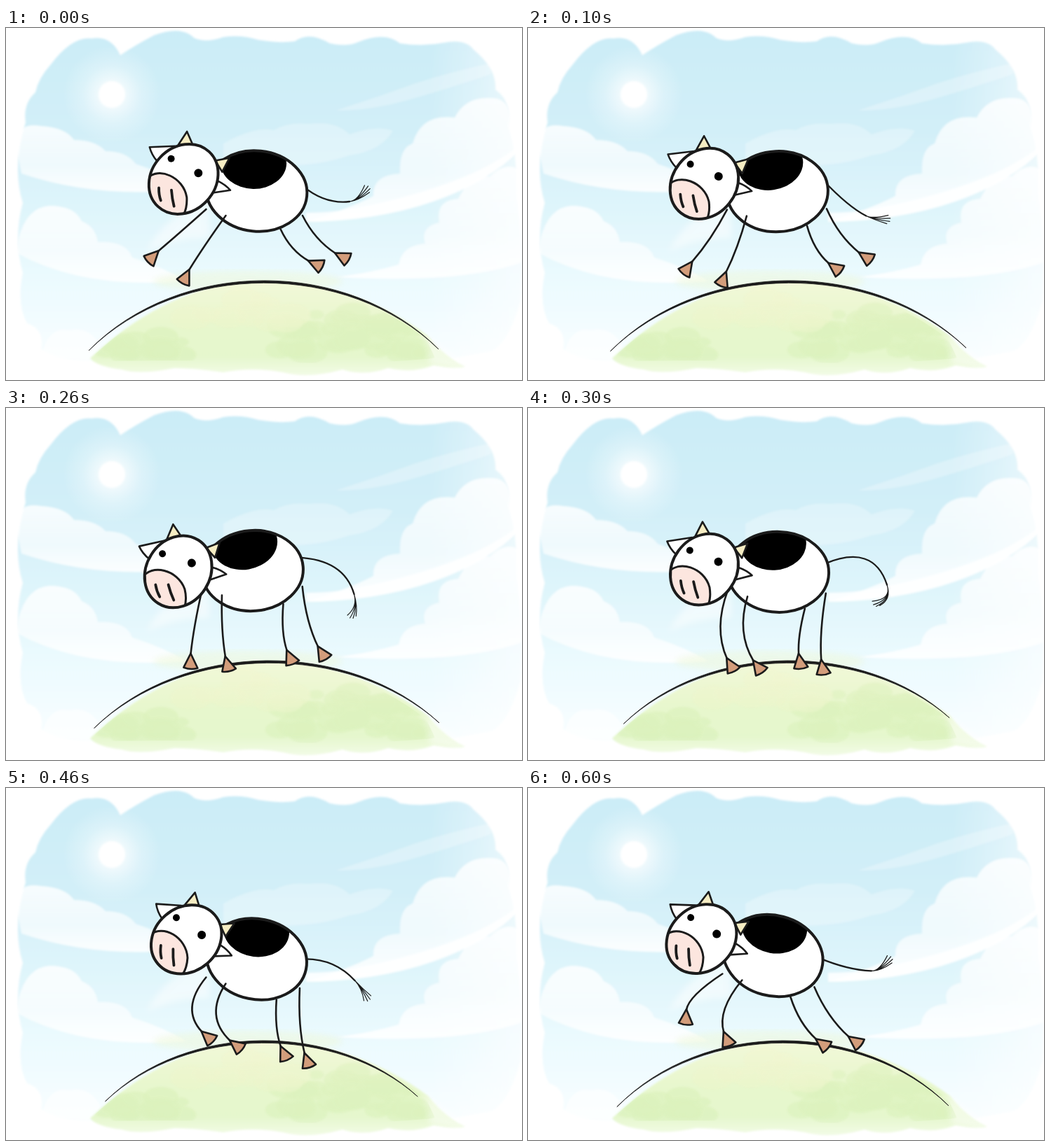
Recreate the animation shown at these times as an HTML page. Size 736 px wide and 503 px high, loop 0.7 s.

```html
<!DOCTYPE html>
<html lang="en">
<head>
<meta charset="utf-8">
<title>Galloping cow</title>
<style>
html, body { margin: 0; width: 100%; height: 100%; overflow: hidden; background: #fff; }
svg { display: block; }
.ink { stroke: #1b1b1b; stroke-linejoin: round; stroke-linecap: round; fill: none; }
</style>
</head>
<body>
<svg width="736" height="503" viewBox="0 0 736 503">
  <defs>
    <linearGradient id="sky" x1="0" y1="0" x2="0" y2="1">
      <stop offset="0" stop-color="#cbecf7"/>
      <stop offset=".3" stop-color="#d2eff8"/>
      <stop offset=".55" stop-color="#dff5fb"/>
      <stop offset=".75" stop-color="#ebfafe"/>
      <stop offset="1" stop-color="#f9feff"/>
    </linearGradient>
    <linearGradient id="side">
      <stop offset=".82" stop-color="#fff" stop-opacity="0"/>
      <stop offset="1" stop-color="#fff" stop-opacity=".6"/>
    </linearGradient>
    <linearGradient id="puff" x1="0" y1="0" x2="0" y2="1">
      <stop offset="0" stop-color="#fff" stop-opacity=".82"/>
      <stop offset=".6" stop-color="#fff" stop-opacity=".6"/>
      <stop offset="1" stop-color="#fff" stop-opacity=".88"/>
    </linearGradient>
    <radialGradient id="glow">
      <stop offset=".25" stop-color="#fff" stop-opacity=".7"/>
      <stop offset=".6" stop-color="#fff" stop-opacity=".27"/>
      <stop offset="1" stop-color="#fff" stop-opacity="0"/>
    </radialGradient>
    <linearGradient id="grass" x1="0" y1="0" x2="0" y2="1">
      <stop offset="0" stop-color="#f2f8d8"/>
      <stop offset=".5" stop-color="#e7f7cd"/>
      <stop offset=".8" stop-color="#e5f7cd"/>
      <stop offset="1" stop-color="#f2fbe6"/>
    </linearGradient>
    <filter id="soft"><feGaussianBlur stdDeviation="1.5"/></filter>
    <filter id="haze"><feGaussianBlur stdDeviation="5"/></filter>
    <clipPath id="meadow"><path d="M125 468Q235 364 365 364T600 445L612 472Q500 482 400 478T125 476Z"/></clipPath>
    <clipPath id="skull"><ellipse rx="45.5" ry="53.5" transform="rotate(42)"/></clipPath>
    <clipPath id="trunk"><ellipse rx="72" ry="57.5" transform="rotate(5)"/></clipPath>
  </defs>

  <g filter="url(#soft)">
    <path fill="url(#sky)" d="M28 135Q24 108 42 92Q46 72 64 52Q94 12 122 15Q150 10 163 39Q185 24 212 10Q250-4 268 14Q285 22 310 13Q335 9 360 17Q390 22 412 19Q432 4 462 22Q485 27 500 21Q540 4 562 22Q595 27 625 21Q655 15 667 31Q700 58 698 88Q722 105 716 140Q730 180 728 240Q738 300 734 390Q715 455 690 462L620 475H130Q70 476 50 458Q55 430 30 422Q15 395 24 350Q10 300 24 250Q8 200 28 135Z"/>
    <path fill="url(#side)" d="M0 0H736V503H0Z"/>
  </g>
  <circle cx="151" cy="95" r="70" fill="url(#glow)"/>
  <circle cx="151" cy="95" r="19" fill="#fff" filter="url(#soft)"/>

  <g filter="url(#soft)">
    <g fill="#fff" opacity=".28">
      <path d="M692 50Q620 66 570 84T470 118Q520 118 570 104T692 66Z"/>
      <path d="M310 165Q355 140 382 146Q400 134 432 137Q470 132 490 152Q530 138 552 147Q535 176 490 182Q450 196 400 197L310 200Z"/>
    </g>
    <g fill="url(#puff)">
      <path d="M12 160Q20 134 50 140Q85 142 97 160Q128 160 142 176Q172 176 185 194L215 205V234Q110 238 22 208Z"/>
      <path d="M524 240Q522 210 562 208Q560 172 580 165Q592 122 640 128Q655 98 690 100Q722 98 718 140Q736 150 735 172Q685 225 590 253Q510 276 428 277Q490 258 524 240Z"/>
      <path d="M18 300Q30 256 62 254Q98 254 108 276Q128 284 131 306Q172 304 180 328Q220 340 258 362Q110 374 16 322Z"/>
      <path d="M560 338Q565 310 598 308Q590 284 618 278Q612 246 645 244Q660 212 690 212Q715 188 736 205V335Q650 366 470 356Q520 350 560 338Z"/>
    </g>
    <path fill="#fff" opacity=".85" d="M735 165Q690 205 590 235T428 264V277Q530 276 610 248T735 172Z"/>
    <path fill="#fff" opacity=".5" d="M200 320Q225 270 290 240V300Q240 300 200 320Z" filter="url(#haze)"/>
    <path fill="#fff" opacity=".6" d="M50 470Q60 425 90 432Q120 425 135 455L120 475Z"/>
  </g>

  <ellipse cx="345" cy="362" rx="135" ry="15" fill="#eef8dc" opacity=".6" filter="url(#haze)"/>
  <path fill="url(#grass)" filter="url(#soft)" d="M120 472Q235 363 365 362T602 440Q625 470 655 484Q640 488 610 482Q580 494 545 486Q510 498 480 488Q430 502 395 492Q350 484 310 492Q270 486 240 486Q190 496 165 488Q130 484 120 472Z"/>
  <path fill="#fff" opacity=".5" filter="url(#haze)" d="M596 435L665 490L605 480Z"/>
  <g id="dabs" clip-path="url(#meadow)" filter="url(#soft)" opacity=".2"></g>

  <path id="hill" fill="#1b1b1b" stroke="#1b1b1b" stroke-width=".8"/>
  <g id="tail" class="ink"></g>
  <g id="body">
    <ellipse rx="72" ry="57.5" transform="rotate(5)" fill="#fff"/>
    <ellipse cx="-5" cy="-40" rx="47" ry="37" clip-path="url(#trunk)"/>
    <ellipse class="ink" rx="72" ry="57.5" transform="rotate(5)" stroke-width="4"/>
  </g>
  <g id="legs" class="ink" stroke-width="2.6"></g>
  <g id="head">
    <g class="ink" stroke-width="2.6">
      <path fill="#fff" d="M-38-25Q-46-34-49-45L-13-47ZM49 2Q60 7 67 15L42 19Z"/>
      <path fill="#f6edc3" d="M-8-49L4-68L13-48ZM45-27L65-31L55-11Z"/>
    </g>
    <ellipse rx="45.5" ry="53.5" transform="rotate(42)" fill="#fff"/>
    <path class="ink" style="fill:#fce6df" stroke-width="3" clip-path="url(#skull)" d="M-52 0C-36-18 0-3 5 26Q6 42 0 52L-60 75L-80 10Z"/>
    <ellipse class="ink" rx="45.5" ry="53.5" transform="rotate(42)" stroke-width="4"/>
    <path class="ink" stroke-width="3.8" d="M-35 13Q-35 23-32 31M-17 16Q-16 28-13 39"/>
    <circle cx="-18" cy="-29" r="5"/>
    <circle cx="21" cy="-9" r="6"/>
  </g>
</svg>

<script>
const $ = id => document.getElementById(id);
const STEP = 100, POSES = 7;
let phase = 0;

// Periodic value: mean plus first and second harmonic of the gallop
const wave = (mean, c, s, c2 = 0, s2 = 0) => mean +
  c * Math.cos(phase) + s * Math.sin(phase) +
  c2 * Math.cos(2 * phase) + s2 * Math.sin(2 * phase);

function attach({ x, y, turn }, dx, dy) {
  const a = turn * Math.PI / 180;
  return [x + dx * Math.cos(a) - dy * Math.sin(a), y + dx * Math.sin(a) + dy * Math.cos(a)];
}

const place = (id, { x, y, turn }) =>
  $(id).setAttribute('transform', `translate(${x} ${y}) rotate(${turn})`);

function leg([hx, hy], [bx, by], fx, fy) {
  const kx = (hx + fx) / 2 + bx, ky = (hy + fy) / 2 + by;
  const turn = Math.atan2(fy - ky, fx - kx) * 180 / Math.PI;
  return `<path d="M${hx} ${hy}Q${kx} ${ky} ${fx} ${fy}"/>
    <path fill="#d39d7b" transform="translate(${fx} ${fy}) rotate(${turn - 6})" d="M-1 0L20-10Q23 0 19 10Z"/>`;
}

function tail([x, y]) {
  const bx = wave(466, -14, 12, 3, -9), by = wave(243, 20, -25, -11, 18);
  const ux = wave(493, -9, 4, 6, -7), uy = wave(266, -6, -8, -12, 10);
  const aim = wave(29, -65, 47, 0, -16) * Math.PI / 180;
  const cx = ux + (ux - bx) * .35, cy = uy + (uy - by) * .35;
  let hairs = '';
  for (let i = -1.5; i < 2; i++) {
    const a = aim + i * .13, len = 36 - 3 * Math.abs(i);
    hairs += `M${ux} ${uy}Q${cx} ${cy} ${ux + len * Math.cos(a)} ${uy + len * Math.sin(a)}`;
  }
  return `<path stroke-width="2.3" d="M${x} ${y}Q${bx} ${by} ${ux} ${uy}"/>
    <path stroke-width="1.2" d="${hairs}"/>`;
}

// Arch through a fixed crest, tapering to both ends
function ridge(crest, thick) {
  const lx = wave(129, -11, -6), ly = wave(455, 6, 4);
  const rx = wave(605, 12, 16), ry = wave(450, 9, 2);
  const cy = (crest - (ly + ry) / 8) / .75, inset = (rx - lx) * .26;
  const edge = d => `${lx + inset} ${cy + d} ${rx - inset} ${cy + d}`;
  const back = `${rx - inset} ${cy + thick} ${lx + inset} ${cy + thick}`;
  return `M${lx} ${ly}C${edge(0)} ${rx} ${ry}C${back} ${lx} ${ly}`;
}

function draw(pose) {
  phase = 2 * Math.PI * pose / POSES;
  const body = {
    x: wave(354, -.7, 2.3, 4.2, 1.5), y: wave(238, -3, -7, -2, 2.6), turn: wave(1.4, -.5, -11.4)
  };
  const head = {
    x: wave(251, -1.3, -1.2, 3.5, 3), y: wave(221, -3.7, 9.3, -1.4, -4), turn: wave(.8, 0, -9.3, 0, 2.9)
  };
  place('body', body);
  place('head', head);
  $('hill').setAttribute('d', ridge(361, 4.5));
  $('tail').innerHTML = tail(attach(body, 66, -8));

  // Shoulders stay level, hips turn with the trunk.
  const level = { ...body, turn: 0 };
  const fore = [wave(-17, 11, 16), 6], hind = [-6, 8];
  $('legs').innerHTML =
    leg(attach(level, -72, 26), fore, wave(251, -34, 5), wave(337, -18, 11)) +
    leg(attach(level, -44, 35), fore, wave(298, -30, 2, -7), wave(354, -8, 0)) +
    leg(attach(body, 35, 54), hind, wave(407, 22, 4, 3, 6), wave(354, -13, -17, -8, 2)) +
    leg(attach(body, 66, 34), hind, wave(448, 26, 2, -4, 6), wave(352, -24, -22, -6));
}

// Watercolour dabs, denser towards the lower left and the right
let seed = 7;
const rand = () => (seed = seed * 16807 % 2147483647) / 2147483647;
function dabs(n, x, y, w, h, color) {
  let out = '';
  while (n--) {
    const r = 8 + rand() * 14;
    out += `<ellipse cx="${x + rand() * w}" cy="${y + rand() * h}" rx="${r * 1.4}" ry="${r * .8}" fill-opacity=".7"/>`;
  }
  return `<g fill="${color}">${out}</g>`;
}
$('dabs').innerHTML = dabs(16, 130, 440, 130, 30, '#b5e080') +
  dabs(40, 390, 405, 210, 60, '#b9e388') +
  dabs(14, 260, 380, 160, 45, '#fbf3c4');

let start, shown = -1;
function tick(now) {
  start ??= now;
  const pose = Math.floor((now - start) / STEP) % POSES;
  if (pose !== shown) draw(shown = pose);
  requestAnimationFrame(tick);
}
draw(0);
requestAnimationFrame(tick);
</script>
</body>
</html>
```
